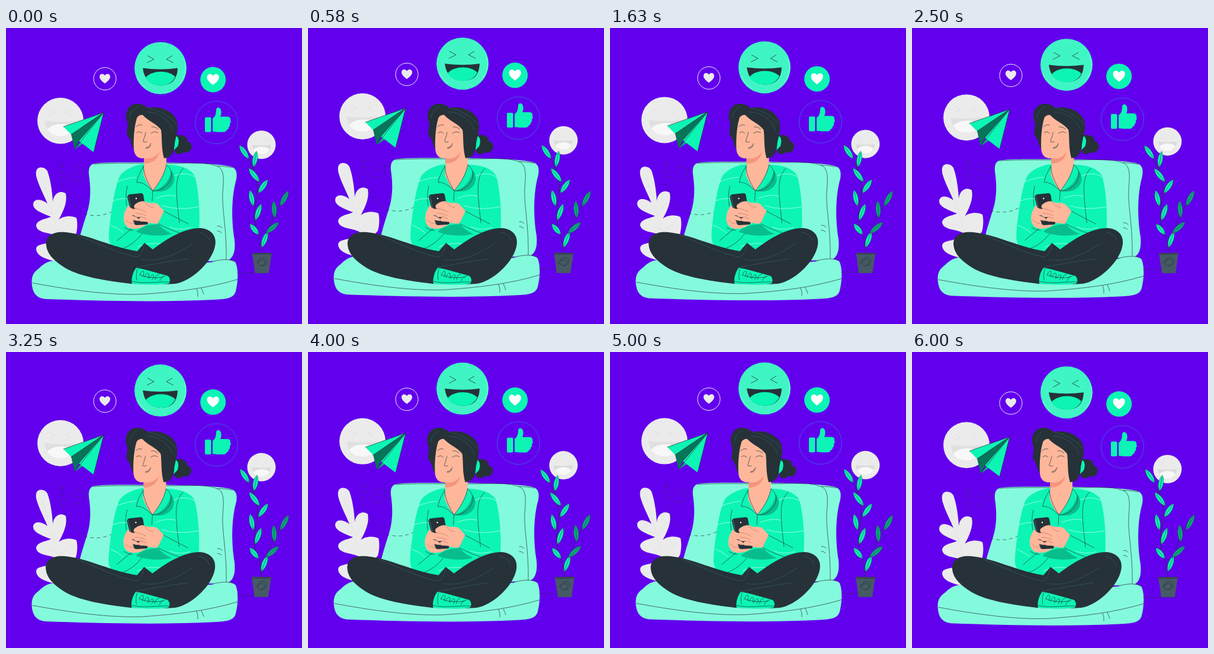
Animation, 500 px wide and 500 px high, one loop 6040 ms. Source, as an HTML page:

```html
<!DOCTYPE html>
<html lang="en">
<head>
<meta charset="utf-8">
<title>Chatting on the couch</title>
<style>
  html, body { margin: 0; width: 100%; height: 100%; overflow: hidden; background: #6200ee; }
  svg { display: block; width: 100vw; height: 100vh; }
  .ink { fill: none; stroke: #263238; stroke-width: .7; stroke-linecap: round; stroke-linejoin: round; }
  .seam { fill: none; stroke: #3d6a86; stroke-width: .5; stroke-linecap: round; }
  .pale { fill: none; stroke: #b9fdea; stroke-width: .8; }
  .mint { fill: #84fadc; }
  .green { fill: #0cf5b5; }
  .shade { fill: #08bd8c; }
  .dark { fill: #263238; }
  .skin { fill: #ffb79b; }
  .gray { fill: #ebebeb; }
</style>
</head>
<body>
<svg viewBox="0 0 500 500">
  <defs>
    <path id="heart" d="M0 8C-4 5-9 1-9-3.5C-9-9-2.5-10 0-5.5C2.5-10 9-9 9-3.5C9 1 4 5 0 8Z"/>
  </defs>

  <g id="floating">
    <path class="gray" d="M57 236C50 237 49 246 53 257C58 272 64 282 70 297C62 290 48 287 46 297C45 307 58 312 76 319C68 323 51 324 51 335C54 347 72 345 87 352C78 368 52 362 51 373C51 384 64 390 82 394L118 350C121 340 121 328 119 321C110 316 95 318 89 324C97 310 104 294 101 280C92 273 80 280 79 294C78 275 75 256 70 242C67 237 62 235 57 236Z"/>
    <path d="M60 250C70 285 82 325 92 365M66 308L80 315M70 338L86 341M96 295L82 315M112 329L91 345" fill="none" stroke="#e0e0e0" stroke-width=".6"/>

    <path class="mint" d="M151 229C180 226 220 228 262 227C300 229 350 228 378 234C389 236 391 244 389 256C380 288 381 328 386 358C388 378 384 390 372 394L118 394C118 370 129 338 137 312C144 290 143 268 140 248C139 236 142 230 151 229Z"/>
    <path class="mint" d="M76 394C140 386 300 402 345 396C362 391 382 389 388 397C393 409 392 430 388 445C385 456 374 458 355 459C260 464 150 461 66 458C51 456 46 448 44 436C42 420 46 413 56 406C63 399 68 396 76 394Z"/>
    <path class="ink" d="M148 230C200 227 250 230 300 228.500C335 227 350 230 361 236C370 245 367 262 366 280C365 310 373 340 372 391M357 233Q372 234 383 236M357 335Q362 334 365 338M357 343Q361 343 364 346M346 396C360 391 375 390 385 394M45 431C110 443 175 452 230 450C290 446 340 440 391 425M322 441Q325 447 324 454M330 440Q333 446 334 450"/>
    <path class="ink" d="M391 414H446" stroke-opacity=".7"/>
    <path class="ink" d="M198 298C180 313 160 321 135 315C112 304 93 275 92 247C90 222 99 226 96 234C93 246 110 268 124 258C138 246 128 230 116 238C108 246 120 256 134 238" stroke-dasharray="5 6"/>

    <g id="faces"></g>

    <circle cx="167" cy="86" r="19" fill="none" stroke="#f4f0ff"/>
    <use href="#heart" x="167" y="86" fill="#ebebeb"/>
    <circle class="green" cx="349.700" cy="87.500" r="21.500"/>
    <use href="#heart" transform="translate(349.700 87.500) scale(1.130)" fill="#fff"/>
    <circle cx="355.500" cy="160" r="36" fill="none" stroke="#2a91dc" stroke-width=".6"/>
    <rect class="green" x="336" y="151" width="10.500" height="25" rx="2"/>
    <path class="green" d="M349 153C354 150 355 144 355 138C356 133 363 134 363.500 141C364 145 363 148 362 150H375Q380 151 379 156Q381 159 378 162Q379 166 376 168Q376 172 373 172Q372 176 367 176C360 176 355 176 349 175Z"/>

    <path class="green" d="M165 143L97 167L110 180Z"/>
    <path fill="#067558" d="M165 143L110 180L116 205L123 191Z"/>
    <path fill="#08a87f" d="M165 143L116 205L131 195Z"/>
    <path class="green" d="M165 143L123 191L148 210Z"/>
    <path class="ink" d="M97 167L165 143L110 180M165 143L116 205M165 143L123 191M165 143L148 210" stroke-width=".4"/>
  </g>

  <g id="woman">
    <path class="dark" d="M282 199C276 187 286 179 296 181C304 182 307 187 306 191C315 193 316 204 310 208C306 212 301 210 299 210C292 217 283 211 285 205Z"/>
    <path class="green" d="M284 183C291 180 294 190 290 200L284 206Z"/>
    <path class="dark" d="M216 205C209 193 213 190 205 182C202 172 209 165 204 157C200 141 208 128 222 128C232 128 237 132 239 135C258 131 280 139 287 153C294 168 287 181 285 196C284 210 280 217 272 219L232 217Z"/>

    <path class="green" d="M231 230C214 233 201 239 193 249C183 268 177 314 174 346C173 367 180 374 196 373L205 379L315 375L326 345C329 312 325 267 318 248C309 236 292 231 272 231Z"/>
    <path class="skin" d="M223 147C217 161 215 186 216 205C217 217 225 221 233 220C234 230 233 239 232 247C236 259 243 270 248 275C256 266 265 252 271 232V212L264 160L238 145Z"/>
    <path d="M233 220C245 222 253 218 259 209C257 222 247 229 233 229Z" fill="#f4957c"/>
    <path class="dark" d="M218 158C220 150 226 146 231 147C240 157 255 162 262 172C264 184 262 203 267 220C276 219 281 213 281 202L286 165L267 140L239 135L218 137L207 150Z"/>
    <path class="seam" d="M240 135C262 139 280 152 288 163M238 142C255 141 276 154 282 172M222 133Q210 139 209 152"/>
    <path class="ink" d="M221 177Q226 173 230 178M245 178Q251 173 257 177M236 176C235 184 231 190 232 192Q235 194 238 192M236 203Q243 205 245 195M237 202Q242 201 243 198" stroke-width=".9"/>
    <path class="ink" d="M220 167Q224 162 230 164M246 167Q252 166 257 171" stroke-width="1.500"/>
    <g fill="#ee7d68"><circle cx="248" cy="187" r=".6"/><circle cx="252" cy="184" r=".6"/><circle cx="254" cy="188" r=".6"/><circle cx="223" cy="187" r=".6"/><circle cx="226" cy="184" r=".6"/></g>

    <path class="shade" d="M279 240C290 254 283 273 263 276Q254 277 248 275C264 272 277 258 279 240Z"/>
    <path class="ink" d="M233 233C227 241 222 253 221 261C230 259 240 268 248 275C239 261 233 247 232 234M271 231C282 239 284 255 269 268Q259 276 248 275C258 263 268 248 271 231M248 275L247 292M205 267Q201 284 204 301M300 237C284 251 287 277 293 329M188 359Q202 347 217 335"/>
    <path class="pale" d="M187 260Q205 253 220 252M180 292Q192 287 205 288M284 250Q302 242 319 251M264 300Q290 309 326 302M177 333Q188 337 199 346M276 336Q292 343 312 337M222 370Q240 361 266 365M253 288Q270 280 288 284"/>
    <path class="shade" d="M220 344C230 334 250 330 258 332C266 340 273 345 281 348C262 352 238 352 220 344Z"/>
    <path class="ink" d="M266 309Q259 319 257 330M258 331C275 340 298 350 310 348M266 309L308 331M200 337Q207 342 215 342M196 373Q216 366 230 348"/>

    <path class="skin" d="M207 300C198 311 197 323 201 331C206 341 219 340 229 337L243 329L238 308Z"/>
    <path class="dark" d="M209 281L228 279Q231 279 232 282L240 328Q240 332 237 332L221 333Q217 333 216 329L205 286Q205 282 209 281Z"/>
    <circle cx="220" cy="288" r="1.200" fill="#fff"/>
    <path class="ink" d="M207 284L217 330" style="stroke:#607d8b"/>
    <path class="skin" d="M217 299C221 295 229 291 235 293C244 298 251 293 257 298L267 309L257 330C247 332 238 326 232 327C223 328 221 322 229 319C219 321 214 317 219 313C213 312 213 306 219 305C216 304 216 301 217 299Z"/>
    <path class="skin" d="M205 300C212 305 215 307 225 306C228 310 220 312 213 310C222 313 231 313 230 317C225 320 216 316 211 316C220 319 227 322 224 326C219 326 211 323 207 320Z"/>
    <path class="seam" d="M219 305Q229 306 237 311M219 313Q229 313 236 317M229 319L237 322M234 293Q240 303 249 303M202 324Q208 331 214 330" style="stroke:#a0574c"/>

    <path class="dark" d="M68 367C66 351 80 343 101 345C141 349 176 370 222 377L234 363L248 374C274 354 304 337 329 338C350 340 358 355 352 373C344 399 312 428 286 432C260 434 233 432 211 432C170 427 120 420 95 402C78 391 69 379 68 367Z"/>
    <path class="seam" d="M121 350C158 365 189 381 221 387C229 384 232 374 234 365M229 391C255 396 283 386 316 364M221 404C251 399 279 393 307 390M326 345Q340 347 344 359"/>
    <path class="green" d="M220 405C233 407 257 414 274 419C278 423 278 431 274 432C253 435 230 433 213 432C211 423 215 411 220 405Z"/>
    <path class="ink" d="M213 428C233 433 256 428 277 429M222 407Q219 418 221 426M226 417C230 407 236 409 231 420M234 421C238 410 244 413 240 423M242 423C247 413 253 416 247 425M252 425Q252 417 259 416M226 417Q242 424 266 421M260 427Q262 419 269 419"/>
  </g>

  <g id="plant">
    <path d="M432 382C433 358 423 347 420 324C418 301 426 286 424 269C424 249 412 226 404 208M432 371C444 347 444 337 451 319C454 309 462 303 472 286M418 240L421 225M426 279L437 262M421 324L427 308" fill="none" stroke="#263238" stroke-width=".8"/>
    <g id="leaves"></g>
    <path d="M416 380H449L444 414H421Z" fill="#455a64"/>
    <path d="M416 380H449L448 383H417Z" fill="#37474f"/>
    <path class="ink" d="M422 398C428 390 438 389 438 395C436 405 425 403 426 395C428 385 440 386 441 392C442 399 436 402 432 401"/>
  </g>
</svg>

<script>
const $ = id => document.getElementById(id);

function face(x, y, r, skin, line, mouth, tongue) {
  return `<g transform="translate(${x} ${y}) scale(${r / 44})">
    <circle r="44" fill="${skin}"/>
    <path d="M40-14A42 42 0 0 1 32 27M-39 15A42 42 0 0 0-24 34" fill="none" stroke="#fff" stroke-opacity=".45" stroke-width=".8"/>
    <path d="M-22-21L-11-15L-23-9M20-21L10-15L22-9" fill="none" stroke="${line}" stroke-width=".8"/>
    <path d="M-30 0Q0 4 29 0Q28 29 1 29Q-26 29-30 0Z" fill="${mouth}"/>
    <path d="M-25 16C-14 3 14 3 25 15Q18 29 1 29Q-18 29-25 16Z" fill="${tongue}"/>
  </g>`;
}

$('faces').innerHTML =
  face(261, 68, 44, '#40f5c4', '#263238', '#263238', '#0cf5b5') +
  face(92, 157, 39, '#ebebeb', '#dadada', '#e0e0e0', '#f8f8f8') +
  face(431.5, 197.5, 24, '#ebebeb', '#dadada', '#dcdcdc', '#f8f8f8');

// Each leaf: tip x, tip y, base x, base y
const leaves = [
  [394, 198, 410, 221], [423, 208, 418, 235], [410, 237, 428, 260],
  [442, 256, 426, 279], [412, 274, 418, 301], [431, 297, 421, 325],
  [412, 331, 427, 349], [442, 344, 432, 371],
  [461, 328, 439, 347], [452, 292, 454, 321], [477, 275, 463, 301]
];
const DARK_FROM = 8;

$('leaves').innerHTML = leaves.map(([x1, y1, x2, y2], i) => {
  const len = Math.hypot(x2 - x1, y2 - y1);
  const turn = Math.atan2(y2 - y1, x2 - x1) * 180 / Math.PI;
  const color = i < DARK_FROM ? '#0cf5b5' : '#08a87f';
  return `<g transform="translate(${x1} ${y1}) rotate(${turn})">
    <path d="M0 0C${len * .3}-6 ${len * .75}-5 ${len} 0C${len * .75} 5 ${len * .3} 6 0 0Z" fill="${color}" stroke="#263238" stroke-width=".4"/>
    <path d="M3 0H${len}" stroke="#263238" stroke-width=".5"/></g>`;
}).join('');

// Steps are [progress, value], joined by straight lines.
const lift = [[0, .4], [.5, -9.6], [1, .4]];
const sway = [[0, 0], [.25, 1], [.75, -1], [1, 0]];
const shake = [[0, 0], [.1, -1], [.2, 2], [.3, -4], [.4, 4], [.5, -4],
  [.6, 4], [.7, -4], [.8, 2], [.9, -1], [1, 0]];

function at(steps, time, period) {
  const p = time % period / period;
  const i = steps.findIndex(step => step[0] > p);
  const [p0, a] = steps[i - 1], [p1, b] = steps[i];
  return a + (b - a) * (p - p0) / (p1 - p0);
}

const LOOP = 6040, COUNT = 150, TICK = 40, LEAD = 50;
const start = performance.now();

function draw() {
  const now = Math.max(0, performance.now() - start) % LOOP;
  const t = Math.floor(now / LOOP * COUNT) * TICK + LEAD;
  $('floating').setAttribute('transform', `translate(0 ${at(lift, t, 1500)})`);
  $('woman').setAttribute('transform', `translate(${at(shake, t, 6000)} 0)`);
  $('plant').setAttribute('transform', `rotate(${at(sway, t, 1500)} 435.5 306)`);
  requestAnimationFrame(draw);
}
draw();
</script>
</body>
</html>
```
